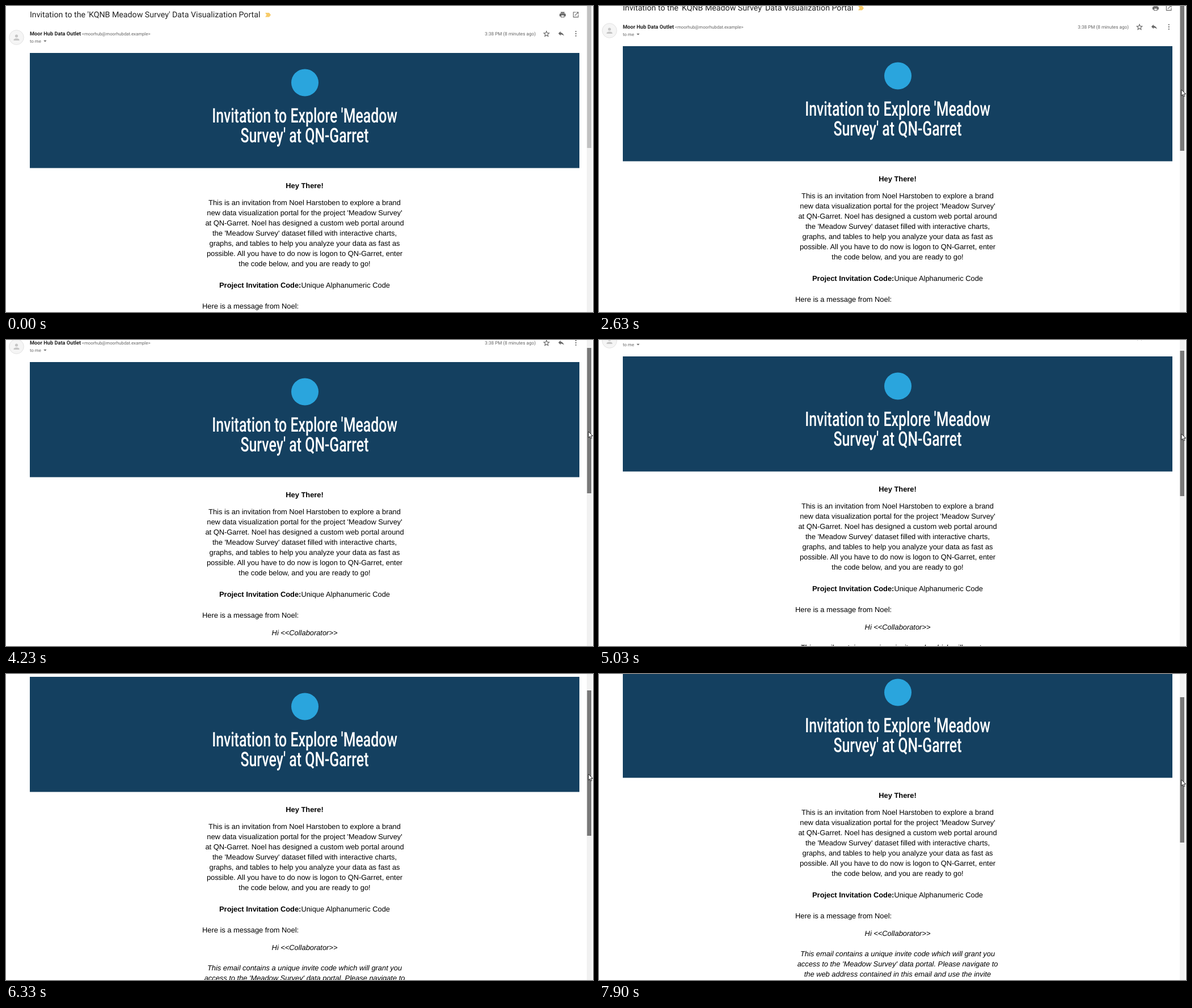
Animation, 1035 px wide and 541 px high, one loop 8 s. Source, as an HTML page:

```html
<!DOCTYPE html>
<html lang="en">
<head>
<meta charset="utf-8">
<title>Invitation email</title>
<style>
  html, body { margin: 0; width: 100%; height: 100%; overflow: hidden; background: #fff; }
  svg { display: block; text-rendering: geometricPrecision; }
  .ui { font-family: Roboto, sans-serif; fill: #666; }
  .subject { font-size: 14.2px; fill: #222; }
  .sender { font-size: 9.25px; font-weight: 700; fill: #222; }
  .small { font-size: 7.8px; }
  .title { font: 500 35.5px Roboto, sans-serif; fill: #fff; text-anchor: middle; }
  .mail { font: 12.87px "Liberation Sans", Arial, sans-serif; fill: #000; text-anchor: middle; }
  .bold { font-weight: 700; }
  .italic { font-style: italic; }
  .left { text-anchor: start; }
  .icon { fill: #666; }
</style>
</head>
<body>
<svg width="1035" height="541" viewBox="0 0 1035 541">
  <g id="page">
    <g class="ui">
      <text class="subject" x="42" y="20">Invitation to the 'KQNB Meadow Survey' Data Visualization Portal</text>
      <text class="sender" x="42" y="51.7">Moor Hub Data Outlet</text>
      <text class="small" x="134" y="51.5">&lt;moorhub@moorhubdat.example&gt;</text>
      <text class="small" x="42" y="64.5">to me</text>
      <text x="934" y="51.7" font-size="8.2" text-anchor="end">3:38 PM (8 minutes ago)</text>
    </g>
    <path fill="#f7cb69" d="M457 12h7l3 3.7-3 3.8h-7l2.5-3.8z"/>
    <circle cx="18.5" cy="55.5" r="12.8" fill="#f5f5f5" stroke="#e2e2e2"/>
    <path fill="#c6c6c6" d="M13.5 61v-1.2c0-3.4 10-3.4 10 0V61z"/>
    <circle cx="18.5" cy="53" r="2.6" fill="#c6c6c6"/>
    <path class="icon" d="M66.3 60.8h5.2l-2.6 2.7z"/>

    <g class="icon">
      <path transform="translate(974.8 8.8) scale(.55)" d="M18 3H6v4h12zM5 8a3 3 0 0 0-3 3v6h4v4h12v-4h4v-6a3 3 0 0 0-3-3zm3 6h8v5H8z" fill-rule="evenodd"/>
      <path transform="translate(998.2 8.8) scale(.54)" d="M19 19H5V5h7V3H3v18h18v-9h-2zM14 3v2h3.6l-9.8 9.8 1.4 1.4L19 6.4V10h2V3z"/>
      <path transform="translate(972.3 42) scale(.55)" d="M10 9V5l-7 7 7 7v-4.1c5 0 8.5 1.6 11 5.1-1-5-4-10-11-11z"/>
      <path d="M1004.8 45v8" stroke="#666" stroke-width="2.2" stroke-linecap="round" stroke-dasharray="0 3.9"/>
    </g>
    <path transform="translate(946.5 42.4) scale(.54)" fill="none" stroke="#666" stroke-width="2"
      d="M12 3.8l2.5 5.9 6.3.5-4.8 4.2 1.5 6.3-5.5-3.4-5.5 3.4L8 14.4l-4.8-4.2 6.3-.5z"/>

    <path fill="#144060" d="M42 83h969v203.5H42z"/>
    <circle cx="527" cy="135.5" r="24" fill="#2aa5dd"/>
    <g class="title">
      <text transform="translate(526.5 206) scale(.7 1)">Invitation to Explore 'Meadow</text>
      <text transform="translate(526.5 241) scale(.7 1)">Survey' at QN-Garret</text>
    </g>
    <g id="mail" class="mail">
      <text x="526.5" y="498"><tspan class="bold">Project Invitation Code:</tspan>Unique Alphanumeric Code</text>
    </g>
  </g>

  <path fill="#f1f1f1" d="M1024 0h9v541h-9z"/>
  <rect id="thumb" x="1024.5" width="7.5" height="257"/>
  <path id="cursor" fill="#fff" stroke="#111" stroke-width=".9" stroke-linejoin="round"
    d="M0 0V10.6L2.4 8.4 4 12.2 5.8 11.4 4.2 7.7H7.6z"/>
</svg>
<script>
const LOOP = 8000;
const el = id => document.getElementById(id);

function addLines(y, className, lines, x = 526.5) {
  lines.forEach((line, i) => {
    const text = document.createElementNS("http://www.w3.org/2000/svg", "text");
    text.setAttribute("x", x);
    text.setAttribute("y", y + i * 18);
    text.setAttribute("class", className);
    text.textContent = line;
    el("mail").append(text);
  });
}

addLines(321.5, "bold", ["Hey There!"]);
addLines(352.4, "", [
  "This is an invitation from Noel Harstoben to explore a brand",
  "new data visualization portal for the project 'Meadow Survey'",
  "at QN-Garret. Noel has designed a custom web portal around",
  "the 'Meadow Survey' dataset filled with interactive charts,",
  "graphs, and tables to help you analyze your data as fast as",
  "possible. All you have to do now is logon to QN-Garret, enter",
  "the code below, and you are ready to go!"
]);
addLines(535.4, "left", ["Here is a message from Noel:"], 346);
addLines(566.3, "italic", ["Hi <<Collaborator>>"]);
addLines(602.4, "italic", [
  "This email contains a unique invite code which will grant you",
  "access to the 'Meadow Survey' data portal. Please navigate to",
  "the web address contained in this email and use the invite"
]);

// The hand drags unevenly: [time, scroll]
const drag = [[2050, 0], [2630, 12], [3770, 39], [5030, 54], [6330, 78], [7230, 93], [7900, 103]];

function scrollAt(time) {
  const next = drag.findIndex(key => key[0] > time);
  if (next === 0) return 0;
  if (next < 0) return drag.at(-1)[1];
  const [t0, y0] = drag[next - 1], [t1, y1] = drag[next];
  return Math.round(y0 + (y1 - y0) * (time - t0) / (t1 - t0));
}

function moveTo(id, x, y) {
  el(id).setAttribute("transform", `translate(${Math.round(x)} ${Math.round(y)})`);
}

function draw(time) {
  const scroll = scrollAt(time);
  moveTo("page", 0, -scroll);
  moveTo("thumb", 0, scroll * 0.455 - 6);
  el("thumb").setAttribute("fill", time < 500 ? "#c1c1c1" : time < 1900 ? "#a8a8a8" : "#787878");

  // The pointer swings in from the lower right, then holds the thumb
  const enter = Math.min(1, Math.max(0, (time - 170) / 1100));
  const away = 1 - enter;
  moveTo("cursor", 1027 + 8 * away * Math.cos(1.5 * Math.PI * enter), 143 + 150 * away ** 2 + scroll * 0.43);
  el("cursor").setAttribute("visibility", enter > 0 ? "visible" : "hidden");
}

const start = performance.now();
function frame() {
  draw((performance.now() - start) % LOOP);
  requestAnimationFrame(frame);
}
frame();
</script>
</body>
</html>
```
